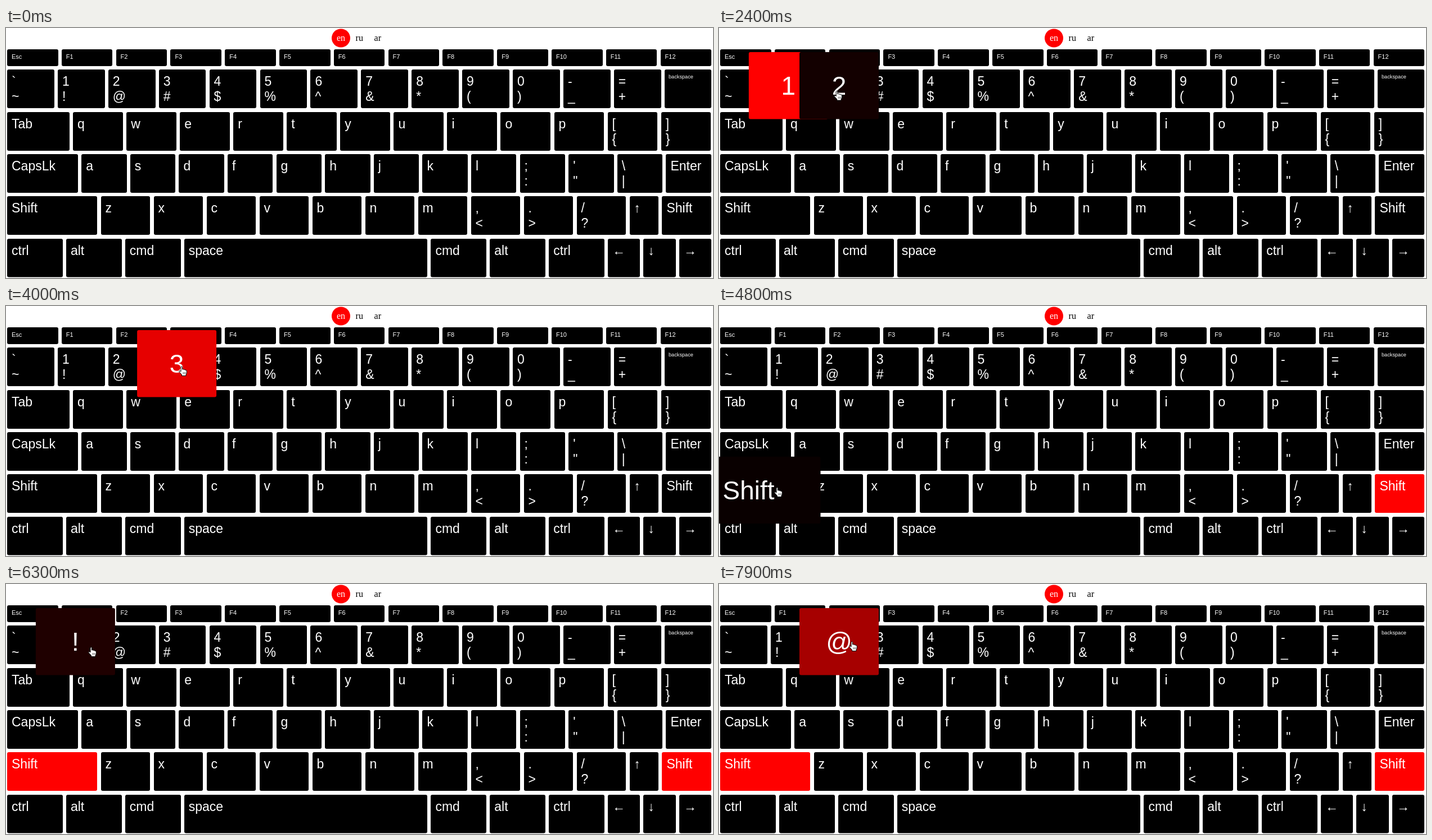
Animation, 1257 px wide and 446 px high, one loop 8 s. Source, as an HTML page with a canvas:

```html
<!DOCTYPE html>
<html lang="en">
<head>
<meta charset="utf-8">
<title>Virtual keyboard</title>
<style>
  html, body { margin: 0; width: 100%; height: 100%; overflow: hidden; background: #fff; }
  canvas { display: block; }
</style>
</head>
<body>
<canvas id="stage" width="1257" height="446"></canvas>
<script>
const ctx = document.getElementById('stage').getContext('2d');
const LOOP = 8000, TICK = 100, GAP = 6.2, FADE = 900;
const SANS = '"Liberation Sans", Arial, sans-serif';
const SERIF = '"Liberation Serif", "Times New Roman", serif';

// top, height, first key width, other key width, labels
const rows = [
  [38, 30, 90.6, 90.6, 'Esc F1 F2 F3 F4 F5 F6 F7 F8 F9 F10 F11 F12'],
  [74, 69, 83.7, 83.7, '`~ 1! 2@ 3# 4$ 5% 6^ 7& 8* 9( 0) -_ =+ backspace'],
  [150, 69, 110.9, 88.85, 'Tab q w e r t y u i o p [{ ]}'],
  [225, 69, 126, 80.4, 'CapsLk a s d f g h j k l ;: \'" \\| Enter'],
  [300, 69, 160.3, 87.8, 'Shift z x c v b n m ,< .> /? ↑ Shift'],
  [376, 68.5, 98.7, 98.7, 'ctrl alt cmd space cmd alt ctrl ← ↓ →'],
];
const widths = { space: 432.5, '↑': 51.7, '←': 57.1, '↓': 57.1, '→': 57.1 };

const keys = rows.flatMap(([y, h, first, rest, labels]) => {
  let x = 2;
  return labels.split(' ').map((label, i) => {
    const w = widths[label] || (i ? rest : first);
    const key = { x, y, w, h, label };
    x += w + GAP;
    return key;
  });
});

// label, start, end, centre x, centre y, width
const popups = [
  ['1', 1305, 2500, 123.4, 102.75, 141],
  ['2', 2323, 3500, 213.5, 102.75, 141],
  ['3', 3438, 4600, 303.6, 102.75, 141],
  ['Shift', 4752, 6000, 52.5, 328.6, 256],
  ['!', 6195, 7400, 123.4, 102.75, 141],
  ['@', 7560, 8000, 213.5, 102.75, 141],
];

// time, x, y
const pointer = [
  [800, 105, 47], [900, 122, 90], [1000, 133, 116], [2000, 133, 116],
  [2200, 197, 112], [2700, 215, 111], [3000, 269, 99], [3300, 306, 106],
  [4000, 307, 107], [4400, 91, 271], [4500, 91, 271], [4600, 98, 323],
  [4800, 98, 323], [5200, 113, 258], [5600, 140, 119], [5700, 146, 112],
  [7000, 146, 112], [7200, 203, 105], [7300, 203, 105], [7900, 231, 102],
];
const hand = new Path2D('M4 1.5 Q5.5 0 6.6 1.5 V6 Q8.5 5 9.3 6.6 Q11 5.8 11.8 7.2 Q14.3 6.8 14.3 9 V12 Q14 14.5 13 15.5 V17.5 H5.5 V15.5 L1 10.5 Q.2 8.6 2 8.5 L4 10 Z');

// Standard CSS "ease" curve
function ease(p) {
  if (p >= 1) return 1;
  let lo = 0, hi = 1, s = 0;
  for (let i = 0; i < 20; i++) {
    s = (lo + hi) / 2;
    if (.75 * s * (1 - s) + s ** 3 < p) lo = s; else hi = s;
  }
  return .3 * s * (1 - s) ** 2 + 3 * s * s * (1 - s) + s ** 3;
}

function box(x, y, w, h, color) {
  ctx.fillStyle = color;
  ctx.beginPath();
  ctx.roundRect(x, y, w, h, 3);
  ctx.fill();
}

function text(str, x, y, size, family = SANS, color = '#fff', align = 'left') {
  ctx.font = `${size}px ${family}`;
  ctx.fillStyle = color;
  ctx.textAlign = align;
  ctx.fillText(str, x, y);
}

function drawKey({ x, y, w, h, label }, shifted) {
  const left = Math.round(x), right = Math.round(x + w);
  box(left, y, right - left, h, shifted && label === 'Shift' ? '#f00' : '#000');
  if (h < 40) text(label, x + 8, y + 17, 11);
  else if (label === 'backspace') text(label, x + 7.3, y + 16, 9.2);
  else if (label.length === 2) [...label].forEach((c, i) => text(c, x + 8, y + 29 + 27 * i, 23));
  else text(label, x + 8, y + 29, 23);
}

function drawPopup([label, start, end, cx, cy, w], t) {
  if (t < start || t >= end) return;
  const red = Math.round(255 * ease((t - start) / FADE));
  box(cx - w / 2, cy - 59.75, w, 119.5, `rgb(${red},0,0)`);
  text(label, cx, cy + 16.5, 46, SANS, '#fff', 'center');
}

function drawPointer(t) {
  const next = pointer.findIndex(p => p[0] > t);
  if (!next) return;
  const b = pointer[next < 0 ? pointer.length - 1 : next];
  const a = next < 0 ? b : pointer[next - 1];
  const k = a === b ? 0 : (t - a[0]) / (b[0] - a[0]);
  ctx.save();
  ctx.translate(a[1] + (b[1] - a[1]) * k, a[2] + (b[2] - a[2]) * k);
  ctx.fillStyle = '#fff';
  ctx.strokeStyle = '#000';
  ctx.lineWidth = 1;
  ctx.fill(hand);
  ctx.stroke(hand);
  ctx.beginPath();
  for (const x of [8, 10, 12]) { ctx.moveTo(x, 11); ctx.lineTo(x, 14.5); }
  ctx.lineWidth = .6;
  ctx.stroke();
  ctx.restore();
}

function draw(t) {
  ctx.fillStyle = '#fff';
  ctx.fillRect(0, 0, 1257, 446);
  ctx.fillStyle = '#f00';
  ctx.beginPath();
  ctx.arc(595.5, 18, 16.5, 0, Math.PI * 2);
  ctx.fill();
  text('en', 587.9, 23, 16, SERIF);
  text('ru', 621.6, 23, 16, SERIF, '#000');
  text('ar', 654.6, 23, 16, SERIF, '#000');
  keys.forEach(key => drawKey(key, t >= 4800));
  popups.forEach(popup => drawPopup(popup, t));
  drawPointer(t);
}

const begin = performance.now();
function frame() {
  const t = (performance.now() - begin) % LOOP;
  draw(Math.floor(t / TICK) * TICK);
  requestAnimationFrame(frame);
}
frame();
</script>
</body>
</html>
```
